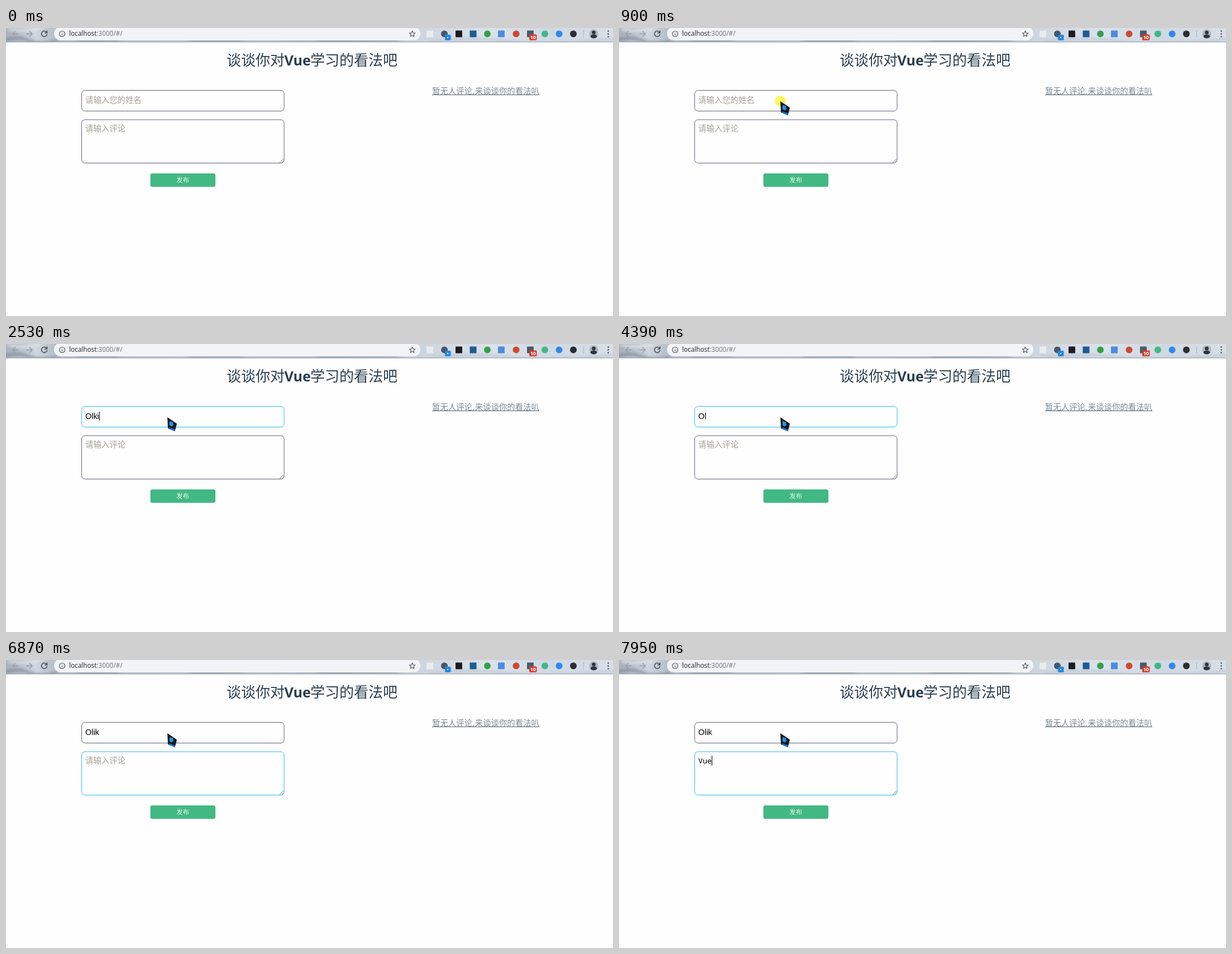
An HTML page that plays this animation: 1087x515 px, repeating every 8000 ms.

```html
<!DOCTYPE html>
<html lang="zh">
<head>
<meta charset="utf-8">
<title>Comment form</title>
<style>
html, body { margin: 0; width: 100%; height: 100%; overflow: hidden; background: #fefefe; }
svg { display: block; width: 1087px; height: 515px; }
text { white-space: pre; }
.cjk { font-family: "Noto Sans CJK SC", "Noto Sans CJK", sans-serif; font-weight: 300; }
.ui { font-family: "Noto Sans", "Open Sans", sans-serif; }
.hint { font-size: 14.4px; fill: #a5a097; }
.title { font-size: 26px; font-weight: 400; fill: #2c3e50; }
.link { font-size: 14.4px; fill: #7b8a92; }
.typed { font: 14.4px "Liberation Sans", Arial, sans-serif; }
.code { font: 13.33px "Noto Sans Mono", "DejaVu Sans Mono", monospace; }
.line { fill: none; stroke-linecap: round; stroke-linejoin: round; }
</style>
</head>
<body>
<svg viewBox="0 0 1087 515" xmlns="http://www.w3.org/2000/svg">
  <defs>
    <linearGradient id="sky">
      <stop offset="0" stop-color="#a9b0bb"/>
      <stop offset=".025" stop-color="#b9c0ca"/>
      <stop offset=".05" stop-color="#d0d6de"/>
      <stop offset=".08" stop-color="#b4bdc9"/>
      <stop offset=".3" stop-color="#bcc5d1"/>
      <stop offset=".55" stop-color="#b2bccb"/>
      <stop offset=".7" stop-color="#d0d7e0"/>
      <stop offset=".8" stop-color="#dbe1e9"/>
      <stop offset=".9" stop-color="#d0d8e2"/>
      <stop offset="1" stop-color="#d9dfe7"/>
    </linearGradient>
    <linearGradient id="bar">
      <stop offset="0" stop-color="#24485a"/>
      <stop offset=".25" stop-color="#234757"/>
      <stop offset=".6" stop-color="#0f212b"/>
      <stop offset="1" stop-color="#07090d"/>
    </linearGradient>
    <linearGradient id="shade" x2="0" y2="1">
      <stop offset="0" stop-color="#000" stop-opacity=".45"/>
      <stop offset=".45" stop-color="#000" stop-opacity="0"/>
      <stop offset="1" stop-color="#000" stop-opacity=".4"/>
    </linearGradient>
    <filter id="soft" x="-20%" y="-60%" width="140%" height="220%"><feGaussianBlur stdDeviation="1.4"/></filter>
    <filter id="mist" x="-10%" y="-100%" width="120%" height="300%"><feGaussianBlur stdDeviation="4 2"/></filter>
    <clipPath id="top"><rect width="1087" height="25"/></clipPath>
    <path id="heart" d="M0 11C-5 6-11 1-11-4C-11-10-3-11 0-5C3-11 11-10 11-4C11 1 5 6 0 11Z"/>
  </defs>

  <rect width="1087" height="515" fill="#fefefe"/>

  <!-- browser bar -->
  <rect width="1087" height="25" fill="url(#sky)"/>
  <g clip-path="url(#top)"><g filter="url(#mist)" class="line" stroke-width="5" opacity=".75">
    <path d="M-5 22Q20 14 40 22T90 24" stroke="#7f8998"/>
    <path d="M5 2Q30 8 60 1" stroke="#e2e6ec"/>
    <path d="M130 25H200M330 25H420M560 25H700" stroke="#8b96a7"/>
    <path d="M760 24Q840 16 900 24T1087 20" stroke="#bcc6d3"/>
  </g></g>
  <rect y="24.5" width="1087" height="1" fill="#8f99aa"/>
  <rect x="86" y="-2" width="656" height="24" rx="12" fill="#f2f4f7"/>
  <g class="line" stroke-width="1.5">
    <path d="M22 10.5H12M16.5 6L12 10.5L16.5 15" stroke="#959ca7"/>
    <path d="M37 10.5H47M42.5 6L47 10.5L42.5 15" stroke="#959ca7"/>
    <path d="M72.5 7.5A5 5 0 1 0 73.3 11.5M73.5 5V8.7H69.8" stroke="#454b54"/>
    <circle cx="100.5" cy="10.5" r="5" stroke="#565b62" stroke-width="1.2"/>
    <path d="M100.5 10V13M100.5 7.8V8" stroke="#565b62" stroke-width="1.2"/>
    <path id="star" stroke="#555b64" stroke-width="1.2"/>
  </g>
  <text class="ui" x="113" y="14" font-size="11.7" fill="#2d3035">localhost<tspan fill="#74787e">:3000/#/</tspan></text>
  <g id="icons"></g>
  <rect x="786" y="12" width="10.5" height="10" rx="2" fill="#1e88e5"/>
  <circle cx="791" cy="17" r="1.3" fill="#fff"/>
  <rect x="937" y="11.5" width="13.5" height="10.5" rx="2" fill="#d83b2c"/>
  <text class="ui" x="943.8" y="20.3" font-size="9" font-weight="700" text-anchor="middle" fill="#fff">10</text>
  <rect x="1034" y="4" width="1" height="13" fill="#a9b3c1"/>
  <circle cx="1052.5" cy="10.5" r="8" fill="#aeb5bd"/>
  <path d="M1046.5 15.8Q1047 11.5 1052.5 11.5T1058.5 15.8Q1056 18.5 1052.5 18.5T1046.5 15.8Z" fill="#30353d"/>
  <circle cx="1052.5" cy="8" r="3.3" fill="#30353d"/>
  <g fill="#454b54"><circle cx="1078.5" cy="5.5" r="1.3"/><circle cx="1078.5" cy="10.5" r="1.3"/><circle cx="1078.5" cy="15.5" r="1.3"/></g>

  <!-- page -->
  <text class="cjk title" x="395" y="67">谈谈你对</text>
  <text class="ui" x="498.5" y="67" font-size="25" font-weight="700" fill="#2c3e50">Vue</text>
  <text class="cjk title" x="545" y="67">学习的看法吧</text>
  <text class="cjk link" x="763" y="118">暂无人评论</text>
  <text class="ui link" x="835" y="118">,</text>
  <text class="cjk link" x="839.8" y="118">来谈谈你的看法叭</text>
  <rect x="763" y="119" width="192" height="1" fill="#51626f"/>

  <rect id="nameBox" x="135.5" y="111.5" width="362.5" height="37" rx="6" fill="#fefefe"/>
  <rect id="noteBox" x="135.5" y="164" width="362.5" height="77.5" rx="6" fill="#fefefe"/>
  <path d="M490.5 240.5L496.5 234.5M494 240.5L496.8 237.7" class="line" stroke="#6a6a6a"/>
  <text id="nameHint" class="cjk hint" x="142" y="134">请输入您的姓名</text>
  <text id="noteHint" class="cjk hint" x="142" y="185">请输入评论</text>
  <text id="name" class="typed" x="142" y="134"></text>
  <text id="note" class="code" x="142" y="185"></text>
  <rect id="compose" y="187" x="150.5" height="1" fill="#111"/>
  <rect id="nameCaret" y="121" width="1" height="16"/>
  <rect id="noteCaret" y="171" width="1" height="18"/>
  <rect x="258.5" y="260" width="116.5" height="24" rx="3.5" fill="#42b883"/>
  <text class="cjk" x="305" y="276.4" font-size="11.6" fill="#e6f6ee">发布</text>

  <!-- input method bar -->
  <g id="popup">
    <rect id="glow" x="163" y="198" height="27" rx="8" fill="#72bdf0" filter="url(#soft)"/>
    <rect id="body" x="164.5" y="199.5" height="24.5" rx="7" fill="url(#bar)"/>
    <rect id="dim" x="164.5" y="199.5" height="24.5" rx="7" fill="url(#shade)"/>
    <g id="hearts" class="line">
      <use href="#heart" transform="translate(371 209) rotate(18) scale(1.1)" stroke="#f7a6bb" stroke-width="2.6" opacity=".85"/>
      <use href="#heart" transform="translate(354 220) rotate(-14) scale(.85)" stroke="#8dbdd6" stroke-width="2.6" opacity=".75"/>
    </g>
  </g>

  <g id="mouse">
    <circle id="spot" r="10" fill="#fffb62" style="mix-blend-mode:multiply"/>
    <path d="M0 0L17 11.5L13.5 25L1 20Z" fill="#15181d"/>
    <path d="M1 20L13.5 25L14.3 22L4 18.2Z" fill="#1c74d0"/>
    <path d="M4 7L9.5 8.5L11 13.5L8 16.5L3.6 14Z" fill="#1f95f2"/>
  </g>
</svg>
<script>
const LOOP = 8000;
const el = id => document.getElementById(id);
const show = (id, on) => el(id).setAttribute("visibility", on ? "visible" : "hidden");
const set = (id, key, value) => el(id).setAttribute(key, value);

// Each extension button is one flat shape: x, colour, round
[[759, "#e9ebed"], [785, "#48566a", 1], [811, "#1c1c1e"], [836.5, "#1d5c93"],
 [862, "#35a04a", 1], [887, "#4d8ce0"], [913.5, "#cf4a2c", 1], [939, "#4d5a68"],
 [965, "#41b883", 1], [990.5, "#3089ea", 1], [1016, "#2b2d31", 1]].forEach(([x, fill, round]) => {
  const r = document.createElementNS("http://www.w3.org/2000/svg", "rect");
  const a = { x: x - 6, y: 4.5, width: 12, height: 12, rx: round ? 6 : 1, fill };
  for (const k in a) r.setAttribute(k, a[k]);
  el("icons").append(r);
});

const star = [...Array(10).keys()].map(i => {
  const a = i * Math.PI / 5, r = i % 2 ? 2.5 : 5.6;
  return (727.5 + r * Math.sin(a)).toFixed(1) + " " + (10.8 - r * Math.cos(a)).toFixed(1);
});
set("star", "d", "M" + star.join("L") + "Z");

// [time, value] lists; the last entry already begun wins
const track = (list, t) => list.reduce((v, [at, next]) => t >= at ? next : v, list[0][1]);
const within = (spans, t) => spans.some(([a, b]) => t >= a && t < b);

const names = [[0, ""], [1770, "O"], [1980, "Ol"], [2360, "Olk"], [2530, "Olki"],
  [4250, "Olk"], [4390, "Ol"], [4710, "Oli"], [4850, "Olik"]];
const notes = [[0, ""], [7180, "V"], [7410, "Vu"], [7640, "Vue"]];
const nameBlink = [[990, 1520], [1770, 3060], [3610, 4090], [4640, 5320]];
const noteBlink = [[5320, 5860], [6320, 6870], [7180, LOOP]];
const path = [[70, [839, 442]], [143, [775, 398]], [216, [705, 352]], [289, [648, 305]],
  [362, [516, 237]], [434, [416, 193]], [507, [375, 167]], [580, [305, 126]],
  [750, [292, 129]], [820, [290, 130]], [900, [289, 131]]];

const idle = [98, 99, 124], focus = [38, 190, 238];
const fade = (t, from) => Math.min(1, Math.max(0, (t - from) / 400));
const border = k => `rgb(${idle.map((c, i) => Math.round(c + (focus[i] - c) * k))})`;

function typeIn(id, text, caretOn) {
  const node = el(id);
  if (node.textContent !== text) node.textContent = text;
  const w = text ? node.getComputedTextLength() : 0;
  set(id + "Caret", "x", Math.round(142 + w));
  show(id + "Caret", caretOn);
  show(id + "Hint", !text);
}

function draw(t) {
  const [x, y] = track(path, t);
  set("mouse", "transform", `translate(${x} ${y})`);
  show("mouse", t >= 70);
  show("spot", t >= 70 && t < 990);

  const moved = fade(t, 5320);
  set("nameBox", "stroke", border(fade(t, 990) - moved));
  set("noteBox", "stroke", border(moved));

  typeIn("name", track(names, t), within(nameBlink, t));
  typeIn("note", track(notes, t), within(noteBlink, t));

  const open = t >= 7410 && t < 7950, grow = t >= 7640 ? 142 : 0;
  show("compose", open);
  set("compose", "width", grow ? 15.5 : 7.5);
  show("popup", open);
  set("glow", "width", 209 + grow);
  set("body", "width", 206 + grow);
  set("dim", "width", 206 + grow);
  set("hearts", "transform", `translate(${grow} ${grow ? 3 : 0})`);
}

const start = performance.now();
function tick() {
  draw((performance.now() - start) % LOOP);
  requestAnimationFrame(tick);
}
tick();
</script>
</body>
</html>
```
